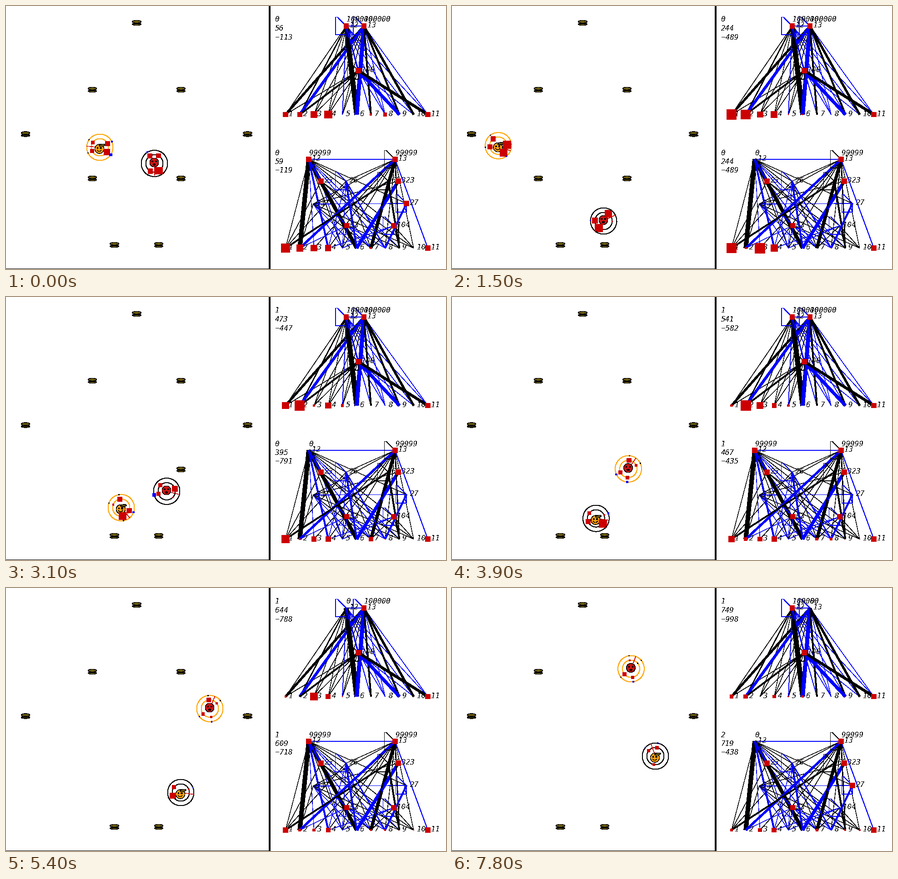
Recreate the animation shown at these times as a matplotlib script. Size 968x578 px, loop 8 s.

```python
import random

import numpy as np
import matplotlib.pyplot as plt
from matplotlib.animation import FuncAnimation
from matplotlib.patches import Arc, Circle, Ellipse, Rectangle
from matplotlib.transforms import Affine2D

W, H, PX = 968, 578, 0.72
RED, BLUE, ORANGE, OLIVE = "#cc0000", "#0000ff", "#ffa500", "#6b5a10"
plt.rcParams.update({"font.family": "DejaVu Sans Mono", "font.style": "italic",
                     "font.size": 16 * PX, "text.antialiased": False,
                     "lines.antialiased": False, "patch.antialiased": False,
                     "lines.solid_capstyle": "butt", "toolbar": "None"})

fig = plt.figure(figsize=(W / 100, H / 100), dpi=100, facecolor="white")
ax = fig.add_axes([0, 0, 1, 1])
ax.set_xlim(0, W)
ax.set_ylim(H, 0)
ax.axis("off")

# Steps on a 100 ms clock; the picture rests for one extra step at HOLDS.
FRAMES = 80
HOLDS = {34, 43, 46, 52, 55, 61, 64, 77, 79}


def stroke(w):
    # Aliased lines cover every pixel they touch, so draw them thinner.
    return max(w - 1, 0.4) * PX


def line(x, y, w=1.0, color="black", z=1):
    return ax.plot(x, y, color=color, lw=stroke(w), zorder=z)[0]


def label(x, y, s=""):
    return ax.text(x, y, s, va="baseline", ha="left", zorder=3)


def square(z):
    return ax.add_patch(Rectangle((0, 0), 0, 0, lw=0, fc=RED, zorder=z))


def place(sq, x, y, h, color=RED):
    sq.set_bounds(x - h, y - h, 2 * h, 2 * h)
    sq.set_facecolor(color)
    sq.set_visible(h > 0.45)


def track(n, rows):
    steps, *cols = zip(*rows)
    return np.array([np.interp(n, steps, c) for c in cols])


class Net:
    """One brain diagram with its counters."""

    def __init__(self, base, hidden, thick, loops, full, blinks=None):
        self.pos = {i: (615 + 31.3 * (i - 1), base) for i in range(1, 12)}
        self.pos.update(hidden)
        self.full, self.blinks = full, blinks or {}
        for a, b, w in thick:
            self.link(a, b, abs(w), BLUE if w < 0 else "black", 1.5)
        for a, color in loops:
            x, y = self.pos[a]
            line(x + np.array([0, -17, -19, -23.5, -23.5, 0, 0]),
                 y + np.array([0, -17, -19.5, -19.5, 19, 19, 0]), 2, color, 2)
        for i, (x, y) in self.pos.items():
            label(x + 7.5, y + 3, str(i))
        self.squares = {i: square(4) for i in self.pos}
        self.values = [label(self.pos[i][0] + 1, self.pos[i][1] - 9.5) for i in (12, 13)]
        top = self.pos[12][1]
        self.counts = [label(592, top - 9.5 + 19.5 * k) for k in range(3)]

    def link(self, a, b, w, color, z=1):
        line(*zip(self.pos[a], self.pos[b]), w, color, z)

    def is_on(self, i, n):
        shift, length = self.blinks.get(i, (0, 11))
        return (n + shift) % 11 < length

    def draw(self, n, sizes, weave, counts):
        for i, h in enumerate(sizes, 1):
            place(self.squares[i], *self.pos[i], h)
        for i in self.pos:
            if i > 13:
                place(self.squares[i], *self.pos[i], 5.7 * self.is_on(i, n))
        # Turning switches one of the two motors off.
        for i, text, on in zip((12, 13), self.values, (weave <= 0, weave >= 0)):
            text.set_text(str(self.full if on else 0))
            place(self.squares[i], *self.pos[i], 5.7 * on)
        for text, value in zip(self.counts, counts):
            text.set_text(str(value).replace("-", "\u2212"))


class Agent:
    """A round creature with two sensor rings."""

    def __init__(self, path, clock, weave, net, face):
        self.path, self.clock, self.weave, self.net = path, clock, weave, net
        self.move = Affine2D()
        self.rings = [self.add(Circle((0, 0), r, fill=False, lw=stroke(2)), 2)
                      for r in (29, 19)]
        self.ray = line([0, 0], [0, 0], 1.5, RED, 3)
        self.sensors = [square(6) for _ in range(8)]
        face(self)

    def add(self, patch, z=4):
        ax.add_patch(patch)
        patch.set_zorder(z)
        patch.set_transform(self.move + ax.transData)
        return patch

    def dot(self, x, y, r, color="black"):
        self.add(Circle((x, y), r, fc=color, ec="black", lw=stroke(1)))

    def at(self, n):
        return track(n, self.path)

    def heading(self, n):
        dx, dy = self.at(max(n, 1)) - self.at(max(n, 1) - 1)
        return np.arctan2(dy, dx) + np.radians(58) * self.weave(n)

    def state(self, n):
        food = sum(who is self and n >= step for step, who in eaten)
        ticks = int(track(n, self.clock)[0])
        return food, ticks, 500 * food - 2 * ticks - (ticks < 500)

    def smell(self, n, angle, things, gain):
        total = 0
        for p in things:
            dx, dy = p - self.at(n)
            near = max(0, np.cos(np.arctan2(dy, dx) - angle))
            total += gain * near ** 2 / np.hypot(dx, dy)
        return min(total, 11.5)

    def draw(self, n, other, leads):
        x, y = self.at(n)
        a = self.heading(n)
        self.move.clear().translate(x, y)
        for ring in self.rings:
            ring.set_edgecolor(ORANGE if leads else "black")
        self.ray.set_data([x, x + 29 * np.cos(a)], [y, y + 29 * np.sin(a)])
        food = [p for p, (step, _) in zip(FOOD, eaten) if n < step]
        spots = a + np.radians([-30, 30, 150, 210])
        sizes = [self.smell(n, b, food, 600) for b in spots]
        sizes += [self.smell(n, b, [other.at(n)], 560) for b in spots]
        for i, sq in enumerate(self.sensors):
            b, r, color = (spots[i % 4], 19, RED) if i < 4 else (spots[i % 4], 29, BLUE)
            h = 0.78 * sizes[i]
            if h < 0.8:
                h, color = 1.3, "black"
            place(sq, x + r * np.cos(b), y + r * np.sin(b), h, color)
        state = self.state(n)
        self.net.draw(n, sizes + [state[0], state[0], 5.7], self.weave(n), state)


def orange_face(a):
    a.dot(-1, 3.5, 10, "#f5a010")
    a.add(Ellipse((5, -4.5), 13, 5, angle=-8, fc=OLIVE, ec="black", lw=stroke(1)))
    a.dot(-5, 1.5, 1.1)
    a.dot(2, 1.5, 1.4, "#401030")
    a.add(Arc((-1.5, 4.5), 10, 9, theta1=15, theta2=165, lw=stroke(1)))


def red_face(a):
    a.dot(-0.5, -2, 9.8, "#cc1414")
    a.dot(-4.5, -4.5, 1.3)
    a.dot(3.5, -4.5, 1.3)
    a.add(Ellipse((-0.5, 2.5), 5, 3, fc="#1c0505", ec="black", lw=stroke(1)))


def burger(x, y):
    parts = [Ellipse((x, y + 3), 19, 5), Rectangle((x - 7, y - 1), 14, 3),
             Ellipse((x, y - 2.5), 19, 6)]
    for p, fill in zip(parts, (OLIVE, "#7a3010", OLIVE)):
        p.set(fc=fill, ec="black", lw=stroke(1), zorder=1)
        ax.add_patch(p)
    return parts


top_net = Net(
    238.5, {12: (748.5, 44), 13: (787.5, 44), 100: (775, 142)},
    [(12, 2, 2.5), (13, 1, 5), (13, 2, -6), (100, 2, 3.5), (12, 6, 11), (13, 6, -9),
     (13, 7, 4), (13, 9, 4), (13, 10, 5), (100, 9, -7), (100, 11, 6),
     (12, 5, -2), (12, 100, -3)],
    [(12, BLUE), (13, BLUE), (100, "black")], 100000)
for a in (12, 13, 100):
    for b in range(1, 12):
        top_net.link(a, b, 1, BLUE if b > 6 else "black")
top_net.link(12, 13, 1, BLUE)

low_net = Net(
    532, {12: (666, 337), 13: (856, 337), 23: (693, 385), 26: (748, 385),
          65: (841, 385), 323: (863, 385), 33: (676, 435), 27: (881, 434),
          63: (750, 482.5), 104: (853, 483)},
    [(12, 2, 10), (12, 6, 8), (12, 23, -4), (12, 4, -4), (13, 7, 7), (13, 2, -5),
     (65, 1, 3.5), (323, 6, -7), (65, 9, 4), (13, 9, 2.5), (65, 7, 3),
     (27, 8, -4), (26, 6, -4), (26, 8, -2.5), (13, 11, -2)],
    [(26, BLUE), (13, "black"), (27, BLUE), (104, BLUE), (63, BLUE), (65, "black")],
    99999, {104: (5, 6), 27: (0, 2), 65: (0, 0), 33: (0, 0), 26: (0, 0)})
rng = random.Random(4)
for b in (1, 3, 5, 8, 9, 13, 26, 27, 104):
    low_net.link(12, b, 1, rng.choice(("black", BLUE, BLUE)))
for b in (3, 4, 5, 8, 10, 26, 33):
    low_net.link(13, b, 1, "black")
for a in (23, 26, 33, 63, 104):
    for b in rng.sample(range(1, 11), 5):
        low_net.link(a, b, 1, rng.choice(("black", BLUE)))
low_net.link(33, 27, 1, BLUE)
low_net.link(33, 323, 1, "black")

FOOD = np.array([(287.5, 37), (190, 184), (385, 184), (43, 281.5), (531.5, 281.5),
                 (190, 379), (385, 379), (238.5, 525), (336, 525)])
burgers = [burger(x, y) for x, y in FOOD]


def hat_weave(n):
    return np.sign(np.sin(np.pi * (n - 1.6) / 5)) if n >= 44 else 0


def red_weave(n):
    return np.sign(np.sin(np.pi * (n - 9) / 8)) if 13 <= n < 36 or n >= 60 else 0


# Way points: step, x, y.  Clock: step, ticks.
hatted = Agent(
    [(0, 206.5, 310.5), (9, 114, 303), (12.3, 62, 290), (15, 102, 307), (27, 199, 398),
     (31, 253.5, 463), (34, 278, 481), (43, 348, 491), (47, 362.5, 475.5),
     (54, 384.5, 449.5), (66, 415, 411), (78, 447.5, 369.5)],
    [(0, 56), (15, 244), (31, 473), (47, 609), (54, 644), (66, 694), (78, 749)],
    hat_weave, top_net, orange_face)
round_red = Agent(
    [(0, 326.5, 346), (12.7, 331, 500), (15, 333.5, 472.5), (25, 340, 440),
     (31, 353.5, 427), (47, 422.5, 328.5), (54, 448.5, 265), (66, 426, 219.5),
     (78, 394, 177.5)],
    [(0, 59), (15, 244), (31, 395), (47, 539), (54, 609), (78, 719)],
    red_weave, low_net, red_face)


def first_bite(p):
    for n in range(FRAMES):
        for agent in (hatted, round_red):
            if np.hypot(*(p - agent.at(n))) < 23:
                return n, agent
    return FRAMES, None


eaten = [first_bite(p) for p in FOOD]

ax.add_patch(Rectangle((578, 0), 4, H, fc="black", lw=0))
ax.add_patch(Rectangle((0, 577), 578, 1, fc="black", lw=0))


def update(i):
    n = i - 1 if i in HOLDS else i
    for parts, (step, _) in zip(burgers, eaten):
        for p in parts:
            p.set_visible(n < step)
    ahead = hatted.state(n)[2] >= round_red.state(n)[2]
    hatted.draw(n, round_red, ahead)
    round_red.draw(n, hatted, not ahead)
    return []


anim = FuncAnimation(fig, update, frames=FRAMES, interval=100, repeat=True,
                     repeat_delay=0, init_func=lambda: update(0))
plt.show()
```
